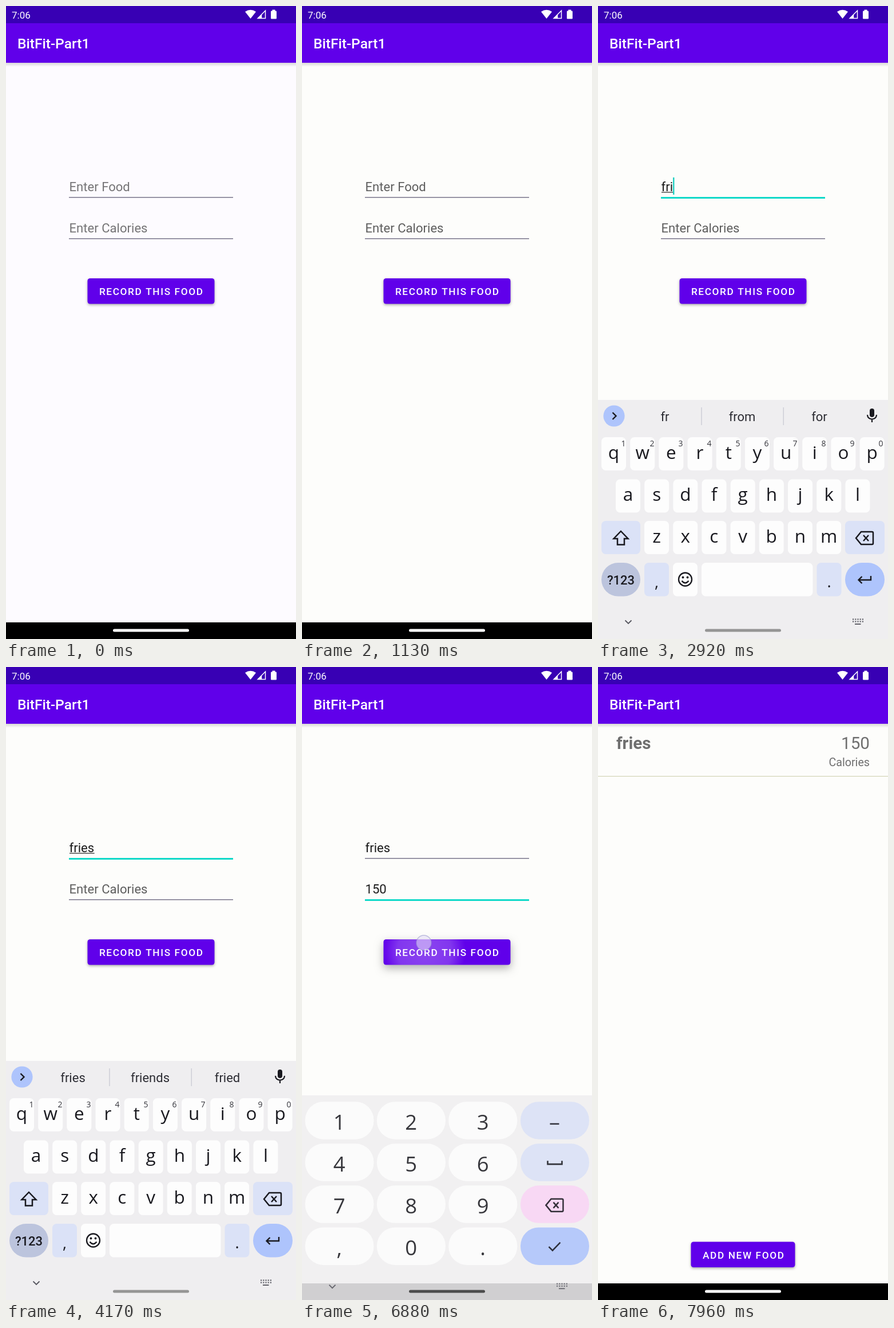
Recreate the animation shown at these times as an HTML page with a canvas. Size 507 by 1104 pixels, loop 8000 ms.

```html
<!DOCTYPE html>
<html lang="en">
<head>
<meta charset="utf-8">
<title>Food log</title>
<style>
html, body { margin: 0; width: 100%; height: 100%; overflow: hidden; background: #fdfdfb; }
canvas { display: block; width: 507px; height: 1104px; }
</style>
</head>
<body>
<canvas id="stage"></canvas>
<script>
const W = 507, H = 1104, LOOP = 8000;
const canvas = document.getElementById('stage');
const dpr = window.devicePixelRatio || 1;
canvas.width = Math.round(W * dpr);
canvas.height = Math.round(H * dpr);
const c = canvas.getContext('2d');

const ROBOTO = 'Roboto, sans-serif';
const KEYFONT = '"Open Sans", "Noto Sans", sans-serif';
const PURPLE = '#6000ea', DARK = '#3800b4', TEAL = '#12d9c9', PAGE = '#fdfdfb';
const INK = '#19191f', KEY = '#fdfdfd', SOFT = '#dbe2f7', BLUE = '#aec4fc', PANEL = '#efeef0';

const clamp = x => Math.max(0, Math.min(1, x));
const span = (t, a, b) => clamp((t - a) / (b - a));
const mix = (a, b, u) => a + (b - a) * u;

// Timeline in ms
const FOCUS1 = 1720, FOCUS2 = 4420, NUMPAD = 4540, HIDE = 6855, LEAVE = 6985;
const FOOD = [2580, 2740, 2900, 3160, 3400];
const CALS = [5280, 5620, 5960];
const TAPS = [
  { x: 205, y: 317, a: 1640, b: 1730 },
  { x: 205, y: 389, a: 4340, b: 4430 },
  { x: 213, y: 481, a: 6770, b: 6890 }
];
const HINTS = [
  [2660, ['f', 'for', 'from']],
  [2800, ['fr', 'from', 'for']],
  [2980, ['fri', 'Friday', 'from']],
  [3240, ['frie', 'friend', 'fries']],
  [3480, ['fries', 'friends', 'fried']]
];

function text(s, x, y, size, color, o = {}) {
  c.font = `${o.weight || 400} ${size}px ${o.font || ROBOTO}`;
  c.textAlign = o.align || 'left';
  c.letterSpacing = (o.space || 0) + 'px';
  c.fillStyle = color;
  c.fillText(s, x, y);
  const w = c.measureText(s).width;
  c.letterSpacing = '0px';
  return w;
}

function rect(x, y, w, h, color) {
  c.fillStyle = color;
  c.fillRect(x, y, w, h);
}

function round(x, y, w, h, r, color) {
  c.beginPath();
  c.roundRect(x, y, w, h, r);
  c.fillStyle = color;
  c.fill();
}

function disc(x, y, r, color) {
  c.beginPath();
  c.arc(x, y, r, 0, 7);
  c.fillStyle = color;
  c.fill();
}

// Icon path centred on x, y
function icon(d, x, y, color, line) {
  c.save();
  c.translate(x, y);
  const p = new Path2D(d);
  if (line) {
    c.lineWidth = line;
    c.strokeStyle = color;
    c.stroke(p);
  } else {
    c.fillStyle = color;
    c.fill(p);
  }
  c.restore();
}

function statusBar() {
  text('7:06', 10, 21.5, 17, '#fff');
  icon('M-9.5 -4.5Q0 -11 9.5 -4.5L0 7.5Z', 427.5, 14.5, '#fff');
  icon('M-7 7H6.3V-6.5Z', 447.2, 14.5, '#fff', 1.5);
  icon('M-7 7H0V0Z', 447.2, 14.5, '#fff');
  round(463, 8.5, 10, 14, 1.2, '#fff');
  rect(465.5, 6.5, 5, 3, '#fff');
}

function appBar() {
  const g = c.createLinearGradient(0, 99, 0, 106);
  g.addColorStop(0, 'rgba(0,0,0,.15)');
  g.addColorStop(1, 'rgba(0,0,0,0)');
  rect(-60, 99, W + 120, 7, g);
  rect(-60, 0, W + 120, 30, DARK);
  rect(-60, 30, W + 120, 69, PURPLE);
  text('BitFit-Part1', 20, 74, 24.6, '#fff', { weight: 500 });
}

function button(label, x, y, w, lift, ripple) {
  c.save();
  c.shadowColor = `rgba(0,0,0,${mix(.32, .3, lift)})`;
  c.shadowBlur = mix(4, 15, lift) * dpr;
  c.shadowOffsetY = mix(2, 6, lift) * dpr;
  round(x, y, w, 44.5, 4.5, PURPLE);
  c.restore();
  if (ripple) {
    c.save();
    c.beginPath();
    c.roundRect(x, y, w, 44.5, 4.5);
    c.clip();
    const r = ripple.r;
    const g = c.createRadialGradient(ripple.x, ripple.y, 0, ripple.x, ripple.y, r);
    g.addColorStop(0, `rgba(255,255,255,${.27 * ripple.a})`);
    g.addColorStop(.65, `rgba(255,255,255,${.21 * ripple.a})`);
    g.addColorStop(1, 'rgba(255,255,255,0)');
    rect(x, y, w, 45, g);
    c.restore();
  }
  text(label, x + 20.5, y + 29, 17.26, '#fff', { weight: 500, space: 1.6 });
}

function field(t, base, value, hint, focused, since, composing, fade) {
  let w = 0;
  if (value) w = text(value, 110.5, base, 22.1, '#1b1b1b');
  else text(hint, 110.5, base, 22.1, `rgba(0,0,0,${mix(.63, .54, fade)})`);
  if (value && composing) rect(111, base + 1.2, w, 1.3, '#333');
  if (focused) {
    rect(110, base + 10, 287, 3, TEAL);
    if ((t - since) % 1000 < 500) rect(110.5 + w, base - 24, 2.4, 30, '#20cfc1');
  } else {
    rect(110, base + 10.1, 287, 1.4, '#6f6b82');
  }
}

function typed(word, times, t) {
  return word.slice(0, times.filter(k => t >= k).length);
}

function lastBefore(times, t) {
  return Math.max(...times.filter(k => k <= t));
}

function formScreen(t) {
  const fade = 1 - span(t, 150, 600);
  rect(-60, 0, W + 120, H, PAGE);
  c.globalAlpha *= 1;
  if (fade > 0) rect(0, 99, W, 976, `rgba(253,251,255,${fade})`);
  appBar();

  const first = t >= FOCUS1 && t < FOCUS2, second = t >= FOCUS2;
  const food = typed('fries', FOOD, t), cals = typed('150', CALS, t);
  field(t, 323, food, 'Enter Food', first, first ? lastBefore([FOCUS1, ...FOOD], t) : 0, first, fade);
  field(t, 395, cals, 'Enter Calories', second, second ? lastBefore([FOCUS2, ...CALS], t) : 0, false, fade);

  const press = span(t, 6770, 6860) * (1 - span(t, 6910, 7060));
  const ripple = t > 6770 && {
    x: 214, y: 495,
    r: mix(25, 76, span(t, 6770, 6890)) + 160 * span(t, 6890, 7100),
    a: span(t, 6770, 6830) * (1 - span(t, 6930, 7150))
  };
  button('RECORD THIS FOOD', 142.5, 475, 222, press, ripple);
}

function listScreen() {
  rect(-60, 0, W + 120, H, PAGE);
  appBar();
  const grey = '#6f6f6f';
  text('fries', 32, 143, 29.6, grey, { weight: 700 });
  text('150', 475, 143, 29.6, grey, { align: 'right' });
  text('Calories', 475, 172.5, 19.7, grey, { align: 'right' });
  rect(-60, 190, W + 120, 1.2, '#d2d4b6');
  button('ADD NEW FOOD', 162.5, 1002.5, 182, 0);
}

const BACK = 'M-15 0L-6 -11H13Q15 -11 15 -9V9Q15 11 13 11H-6ZM-2 -5L7 5M7 -5L-2 5';

function keyboardFoot() {
  icon('M-5.5 -3L0 2.5L5.5 -3', 53, 1074.5, '#55555e', 1.8);
  for (let r = 0; r < 3; r++)
    for (let i = 0; i < 5; i++)
      if (r < 2) rect(445 + i * 4.2, 1068.5 + r * 4, 2.2, 2.2, '#62626a');
  rect(449, 1077, 10.5, 2, '#62626a');
}

function mic(x, y) {
  round(x - 4, y - 12, 8, 15, 4, INK);
  icon('M-8 -1C-8 9 8 9 8 -1M0 6V12', x, y, INK, 2.2);
}

function suggestions(t) {
  disc(28, 715, 18.6, BLUE);
  icon('M-3.5 -6L2.5 0L-3.5 6', 29, 715, INK, 2.4);
  mic(479, 714);
  const shown = HINTS.filter(h => t >= h[0]).pop();
  if (!shown) {
    text('Tap to enable contact suggestions.', 251.5, 723, 19.55, '#3b558f', { align: 'center' });
    return;
  }
  shown[1].forEach((s, i) => text(s, 117 + 135 * i, 724, 22, '#2c2c33', { align: 'center' }));
  rect(180.3, 700, 1.3, 31, '#c9c9d3');
  rect(323.6, 700, 1.3, 31, '#c9c9d3');
}

function letterRow(s, x, y) {
  [...s].forEach((ch, i) => {
    const kx = x + i * 50.18;
    round(kx, y, 43, 58, 7.5, KEY);
    text(ch, kx + 21.5, y + 37.5, 31.5, INK, { align: 'center', font: KEYFONT });
  });
}

function letters(t) {
  rect(0, 687, W, H, PANEL);
  suggestions(t);
  letterRow('qwertyuiop', 6, 752);
  [...'1234567890'].forEach((n, i) =>
    text(n, 44.5 + i * 50, 768, 14, '#33333a', { align: 'center', font: KEYFONT }));
  letterRow('asdfghjkl', 31, 825.5);
  letterRow('zxcvbnm', 81, 898);

  round(6, 898, 68, 58, 7.5, SOFT);
  icon('M0 -12L12.5 1H6V11.5H-6V1H-12.5Z', 40, 928, INK, 2.5);
  round(432, 898, 69, 58, 7.5, SOFT);
  icon(BACK, 466, 928, INK, 2.5);

  round(6, 971, 68, 58.5, 29, '#bcc4dd');
  text('?123', 40, 1009, 22, INK, { align: 'center', weight: 500 });
  round(81, 971, 43, 58.5, 7.5, SOFT);
  text(',', 102.5, 1014, 27, INK, { align: 'center', font: KEYFONT });
  round(131, 971, 43, 58.5, 7.5, KEY);
  icon('M11.5 0A11.5 11.5 0 1 1 -11.5 0A11.5 11.5 0 1 1 11.5 0', 152.5, 1000, INK, 2.3);
  disc(148.5, 996.5, 1.9, INK);
  disc(156.5, 996.5, 1.9, INK);
  icon('M-6 2.5Q0 10 6 2.5', 152.5, 1000, INK, 2.3);
  round(181, 971, 194.5, 58.5, 7.5, KEY);
  round(382.5, 971, 43, 58.5, 7.5, SOFT);
  text('.', 404, 1014, 27, INK, { align: 'center', font: KEYFONT });
  round(432, 971, 69, 58.5, 29, BLUE);
  icon('M11 -6V1H-10M-4.5 -5L-10.5 1L-4.5 7', 466, 1000, INK, 2.4);
  keyboardFoot();
}

function numbers() {
  rect(0, 741, W, H, PANEL);
  const rows = ['123', '456', '789', ',0.'];
  const side = [SOFT, SOFT, '#fad5f5', BLUE];
  rows.forEach((row, r) => {
    const y = 752 + r * 73.1;
    [...row].forEach((ch, i) => {
      round(5.5 + i * 125.4, y, 120, 65.5, 32, KEY);
      text(ch, 65.3 + i * 125.4, y + 48.5, 36.5, INK, { align: 'center', font: KEYFONT });
    });
    round(382, y, 120, 65.5, 32, side[r]);
  });
  rect(433.5, 789.5, 16, 2.5, INK);
  icon('M-12.5 -3.5V2.5H12.5V-3.5', 442, 858.5, INK, 2.6);
  icon(BACK, 441.5, 932.5, INK, 2.5);
  icon('M-10 0.5L-3.5 7L10 -7', 441.5, 1004.5, INK, 2.5);
  keyboardFoot();
}

function keyboard(t) {
  const show = span(t, FOCUS1, FOCUS1 + 320), hide = span(t, HIDE, HIDE + 200);
  if (!show || hide === 1) return;
  const drop = 417 * (1 - show) ** 3 + 363 * hide ** 2;
  c.save();
  c.globalAlpha = (1 - hide) * clamp(show * 3);
  c.translate(0, drop);
  if (t < NUMPAD) letters(t);
  else numbers();
  c.restore();
}

function homeHandle(t) {
  let v = mix(255, 149, span(t, 2000, 2300));
  v = mix(v, 104, span(t, NUMPAD, NUMPAD + 300));
  v = mix(v, 76, span(t, 6700, 6870));
  v = mix(v, 255, span(t, 6960, 7160));
  round(187, 1086.5, 133, 5, 2.5, `rgb(${v},${v},${v})`);
}

function touches(t) {
  for (const p of TAPS) {
    if (t < p.a || t > p.b) continue;
    disc(p.x, p.y, 13, 'rgba(232,224,250,.55)');
    c.lineWidth = 1.3;
    c.strokeStyle = 'rgba(150,150,205,.6)';
    c.stroke();
  }
}

function shifted(dx, alpha, draw) {
  c.save();
  c.translate(dx, 0);
  c.globalAlpha = alpha;
  draw();
  c.restore();
}

function draw(t) {
  c.setTransform(dpr, 0, 0, dpr, 0, 0);
  if (t < LEAVE) {
    formScreen(t);
  } else {
    const u = 1 - (1 - span(t, LEAVE, LEAVE + 450)) ** 4;
    shifted(-50 * (1 - u), 1, listScreen);
    const left = 1 - span(t, LEAVE + 35, LEAVE + 118);
    if (left > 0) shifted(50 * u, left, () => formScreen(t));
  }
  rect(0, 1075, W, 29, '#000');
  statusBar();
  keyboard(t);
  homeHandle(t);
  touches(t);
}

const start = performance.now();
function tick() {
  draw((performance.now() - start) % LOOP);
  requestAnimationFrame(tick);
}
tick();
</script>
</body>
</html>
```
